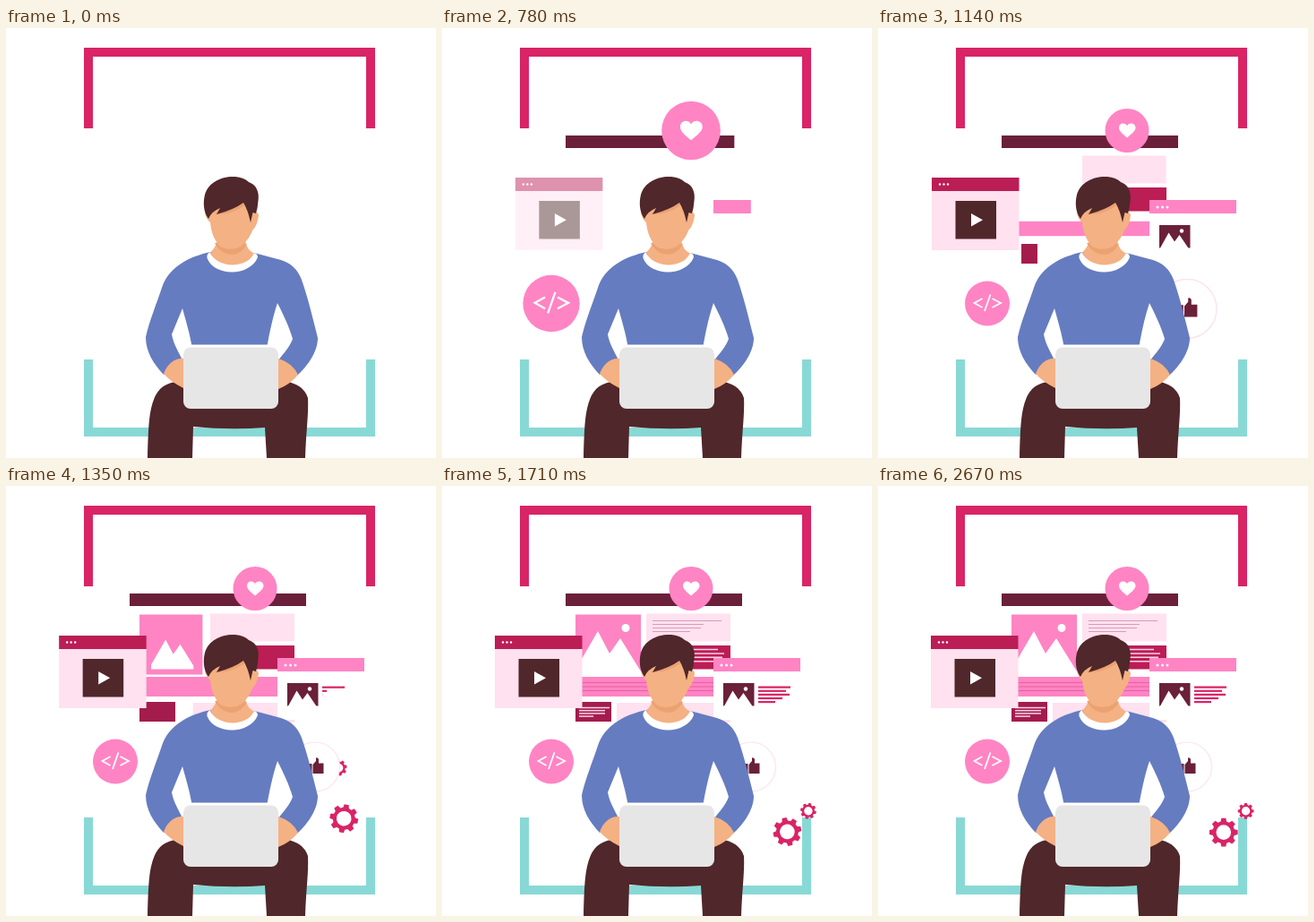
Animation, 480 px wide and 480 px high, one loop 2.7 s. Source, as an HTML page:

```html
<!DOCTYPE html>
<html lang="en">
<head>
<meta charset="utf-8">
<title>Working on a web page</title>
<style>
  html, body { margin: 0; width: 100%; height: 100%; overflow: hidden; background: #fff; }
  svg { display: block; width: 100%; height: 100%; }
  .mag { fill: #d92466; }
  .deep { fill: #bb1d55; }
  .plum { fill: #6b203a; }
  .pink { fill: #ff84c4; }
  .pale { fill: #ffe1ef; }
  .dark { fill: #50272a; }
  .white { fill: #fff; }
  .skin { fill: #f4b183; }
  .blue { fill: #657cc0; }
</style>
</head>
<body>
<svg viewBox="0 0 480 480" xmlns="http://www.w3.org/2000/svg">
  <g fill="none" stroke-width="10">
    <path d="M92 112V27H407V112" stroke="#d92466"/>
    <path d="M92 370V451H407V370" stroke="#88d9d6"/>
  </g>

  <!-- web page -->
  <rect id="bar" class="plum" x="138" y="120" width="197" height="14"/>
  <rect id="intro" class="pale" x="228" y="142.500" width="94" height="31"/>
  <rect id="banner" class="deep" x="228" y="178" width="94" height="26.500"/>
  <rect id="strip" class="pink" x="149" y="213" width="154.500" height="22"/>
  <rect id="label" fill="#a31c4c" x="149" y="241" width="40" height="22"/>
  <rect id="wide" class="pale" x="195" y="242" width="127" height="22"/>
  <rect id="photo" class="pink" x="149" y="143.500" width="73" height="69.500"/>
  <path id="hills" class="white" d="M149 213V205L174 162L187 187L199 170L222 207V213Z"/>
  <circle id="sun" class="white" cx="205" cy="158.500" r="4.500"/>
  <g id="pageText"></g>

  <!-- side card -->
  <g id="card">
    <rect class="white" x="303" y="192" width="97" height="69"/>
    <rect class="pink" x="303" y="192" width="97" height="15"/>
  </g>
  <g id="cardDots" class="white">
    <circle cx="312" cy="200" r="1.500"/><circle cx="317.500" cy="200" r="1.500"/><circle cx="323" cy="200" r="1.500"/>
  </g>
  <g id="thumbPic">
    <rect class="plum" x="314" y="220" width="34.500" height="25.500"/>
    <path class="white" d="M314.500 246.500L324.500 228.500L331 238.500L336.500 231L347 246.500Z"/>
    <circle class="white" cx="339" cy="226.500" r="2.200"/>
  </g>
  <g id="cardText"></g>

  <!-- video window -->
  <g id="window">
    <rect class="pale" x="59" y="182" width="97.500" height="66"/>
    <rect class="deep" x="59" y="167" width="97.500" height="15"/>
    <g class="white">
      <circle cx="68" cy="174.500" r="1.200"/><circle cx="72.500" cy="174.500" r="1.200"/><circle cx="77" cy="174.500" r="1.200"/>
    </g>
    <rect class="dark" x="85.500" y="193" width="45.500" height="42.500"/>
    <path class="white" d="M103 207L116 214.300L103 221.500Z"/>
  </g>

  <!-- badges and gears -->
  <g id="heart">
    <circle class="pink" cx="278" cy="114.500" r="24.500"/>
    <path class="white" d="M278 122.500C272 117.500 269 115 269 111.300C269 106 275.500 104.800 278 109C280.500 104.800 287.500 106 287.500 111.300C287.500 115 284 117.500 278 122.500Z"/>
  </g>
  <g id="code">
    <circle class="pink" cx="122" cy="307.500" r="25"/>
    <path d="M116.500 302L107.500 307L116.500 312M127.500 302L137 307L127.500 312M125.500 297.500L119 316" fill="none" stroke="#fff" stroke-width="1.800"/>
  </g>
  <path id="gearBig" class="mag" fill-rule="evenodd"/>
  <path id="gearSmall" class="mag" fill-rule="evenodd"/>
  <g id="like">
    <circle class="white" cx="345" cy="313.500" r="27.500" stroke="#ffe1ef" stroke-width="1.200"/>
    <path class="plum" d="M336 310H341.500V321H336ZM342.500 311L346 307V303.500Q348 302.500 349 305V309.500H354.500V321H342.500Z"/>
  </g>

  <!-- person -->
  <path class="dark" d="M158 480C159 440 160 425 167 410C173 399 183 394 200 394H304C324 394 334 403 337 413C338 430 335 450 334 480H291L289 446Q250 449 209 445L208 480Z"/>
  <path class="skin" d="M236 232Q236 245 226 252Q234 270 252 271Q270 270 280 253Q268 249 267 236Z"/>
  <path class="blue" d="M228 250C206 255 184 265 175 287C168 308 160 327 156 345C156 362 165 375 176 387L197 371C193 362 187 353 185 342L197 313C201 328 205 340 208 358H291C294 340 298 322 303 307C309 319 316 333 320 347C317 356 309 364 304 371L325 388C336 378 348 362 348 346C343 326 337 301 330 281C325 268 318 263 307 259L277 251C271 274 235 274 228 250Z"/>
  <path class="white" d="M227.500 250Q223 253 225 258C233 277 272 278 281 256Q281 252 277 251C270 269 235 269 227.500 250Z"/>
  <path fill="#eba272" d="M233 240Q240 253 253 253Q263 252 269 241Z"/>
  <path class="skin" d="M222 206Q223 213 228 217C229 229 233 237 239 244Q250 250 262 244C269 238 273 232 275 226Q281 220 282 209Q281 204 276 206L266 190H230Z"/>
  <path fill="#eba272" d="M233 208Q254 208 266 198L264 195L240 202Z"/>
  <path class="dark" d="M226 213C220 205 220 194 222 186C226 172 241 165 256 166Q266 167 271 172C280 175 283 184 281.500 193Q281 201 279 207L275.500 206L273 217Q270 203 265 195Q254 203 235 208L239 201Q229 205 226 213Z"/>
  <path class="skin" d="M176 386C180 375 188 368 198 369V402Q184 395 176 386ZM304 369Q320 374 326 387Q317 398 304 403Z"/>
  <rect x="198" y="355.500" width="106" height="69.500" rx="8" fill="#fff" transform="translate(0 -2)"/>
  <rect x="198" y="356.500" width="106" height="68.500" rx="8" fill="#e6e6e6"/>
</svg>
<script>
const LOOP = 2700, STEP = 30;
const el = id => document.getElementById(id);
const clamp = v => Math.max(0, Math.min(1, v));
const part = (t, start, dur) => clamp((t - start) / dur);
const settle = (t, start) => t < start ? 0 : 1 - Math.exp((start - t) / 115);

function smooth(t, start, dur) {
  const p = part(t, start, dur);
  return p < .5 ? 4 * p ** 3 : 1 - 4 * (1 - p) ** 3;
}

// grow past full size, then ease back
function pop(t, start) {
  return 1.4 * Math.sin(part(t, start, 150) * Math.PI / 2) - .4 * smooth(t, start + 150, 180);
}

function scale(id, x, y, sx, sy = sx) {
  el(id).setAttribute("transform", `translate(${x} ${y}) scale(${sx} ${sy}) translate(${-x} ${-y})`);
}

function gearPath(r, teeth) {
  const ring = [];
  for (let i = 0; i < teeth; i++) {
    for (const [off, k] of [[-.34, .78], [-.2, 1], [.2, 1], [.34, .78]]) {
      const a = (i + off) / teeth * 2 * Math.PI;
      ring.push((r * k * Math.cos(a)).toFixed(2) + " " + (r * k * Math.sin(a)).toFixed(2));
    }
  }
  const h = r * .52;
  return `M${ring.join("L")}ZM${h} 0A${h} ${h} 0 1 0 ${-h} 0A${h} ${h} 0 1 0 ${h} 0Z`;
}

const lines = [];
function addLines(group, color, width, x, y, gap, ends, start, lag, dur) {
  ends.forEach((end, i) => {
    const node = document.createElementNS("http://www.w3.org/2000/svg", "line");
    const set = { x1: x, x2: x, y1: y + gap * i, y2: y + gap * i, stroke: color, "stroke-width": width };
    for (const k in set) node.setAttribute(k, set[k]);
    el(group).append(node);
    lines.push({ node, x, end, start: start + lag * i, dur });
  });
}

addLines("pageText", "#d99ab8", 1, 235, 150.5, 4, [312, 292, 289, 277], 1380, 40, 210);
addLines("pageText", "#ffd3e6", 1.5, 240, 182.5, 4.4, [308, 315, 313, 307], 1380, 40, 210);
addLines("pageText", "#e8609f", 1, 149, 219.5, 4.5, [303, 303, 303], 1300, 70, 270);
addLines("pageText", "#ffd3e6", 1.5, 153, 247.5, 3.2, [187, 182, 182, 170], 1400, 50, 210);
addLines("cardText", "#d92466", 2.2, 353, 224.7, 4.1, [389, 384, 388, 380, 372], 1200, 60, 260);

el("gearBig").setAttribute("d", gearPath(16, 8));
el("gearSmall").setAttribute("d", gearPath(9, 8));

function place(id, x, y, angle, shown) {
  el(id).setAttribute("transform", `translate(${x} ${y}) rotate(${angle})`);
  el(id).setAttribute("visibility", shown ? "visible" : "hidden");
}

function draw(t) {
  scale("bar", 138, 0, smooth(t, 570, 270), 1);
  scale("intro", 228, 0, smooth(t, 870, 300), 1);
  scale("banner", 228, 0, smooth(t, 900, 240), 1);
  scale("strip", 0, 224, 1, smooth(t, 960, 300));
  scale("label", 169, 0, smooth(t, 1005, 280), 1);
  scale("wide", 322, 0, smooth(t, 1140, 300), 1);
  scale("photo", 149, 143.5, smooth(t, 1140, 265));
  scale("hills", 186, 189, smooth(t, 1200, 270));
  scale("sun", 205, 158.5, smooth(t, 1380, 210));

  scale("card", 303, 0, 1 - (1 - part(t, 720, 350)) ** 3, 1);
  scale("cardDots", 317.5, 200, smooth(t, 900, 180));
  scale("thumbPic", 314, 220, smooth(t, 770, 220));

  el("window").setAttribute("transform", `translate(${50 * (1 - settle(t, 690))} 0)`);
  el("window").setAttribute("opacity", part(t, 660, 250));

  scale("heart", 278, 114.5, pop(t, 570));
  scale("code", 122, 307.5, pop(t, 672));
  scale("like", 345, 313.5, pop(t, 900));

  const big = settle(t, 1170), small = settle(t, 1290), turn = (t - 1170) * .06;
  place("gearBig", 345 + 40.8 * big, 313 + 73.6 * big, turn, t >= 1170);
  place("gearSmall", 345 + 65.6 * small, 313 + 49.8 * smooth(t, 1290, 300), -turn, t >= 1290);

  for (const l of lines) l.node.setAttribute("x2", l.x + (l.end - l.x) * smooth(t, l.start, l.dur));
}

function tick() {
  draw(Math.floor(performance.now() % LOOP / STEP) * STEP);
  requestAnimationFrame(tick);
}
tick();
</script>
</body>
</html>
```
